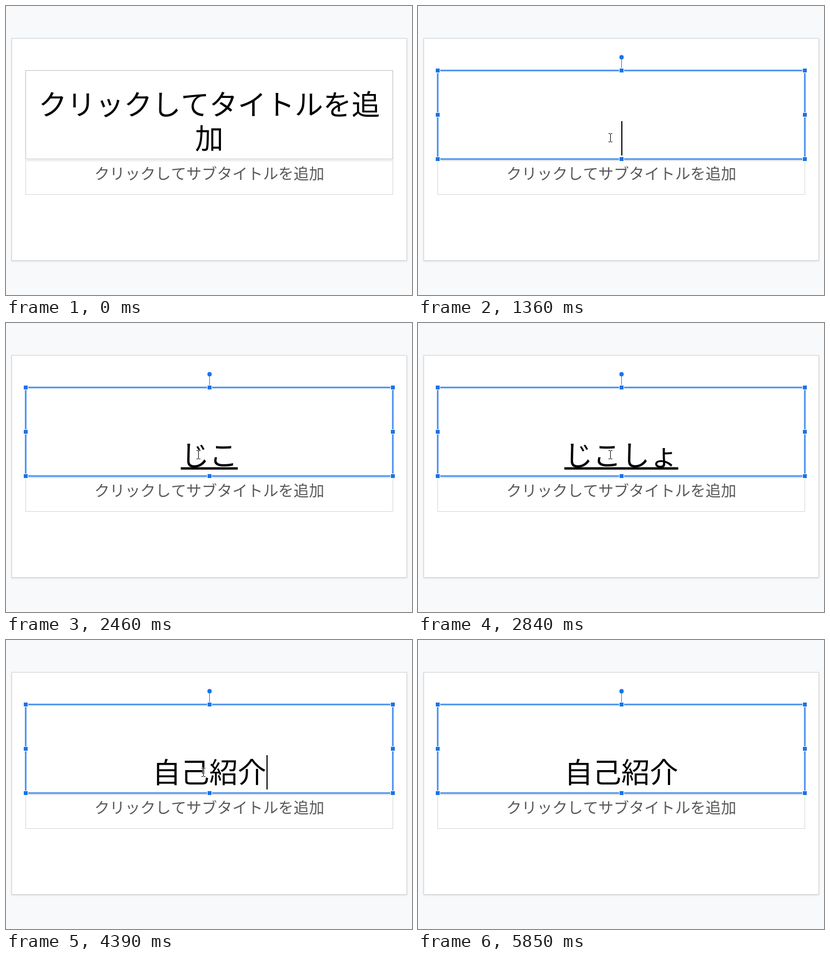
Write an HTML page with a canvas that moves like this. It is 731 px wide and 522 px high and loops after 5.93 s.

```html
<!DOCTYPE html>
<html lang="ja">
<head>
<meta charset="utf-8">
<title>スライドのタイトル入力</title>
<style>
  html, body { margin: 0; width: 100%; height: 100%; overflow: hidden; background: #f8f9fb; }
  canvas { display: block; }
</style>
</head>
<body>
<canvas id="stage" width="731" height="522"></canvas>
<script>
const ctx = document.getElementById('stage').getContext('2d');
const LOOP = 5930;
const MID = 366;
const EM = 51.28;
const BASE = 258;
const BLUE = '#1a73e8';
const FONT = '"Noto Sans CJK JP", "Noto Sans CJK", sans-serif';

// Title input: [start, text, underlined]
const TYPING = [
  [1360, '', false],
  [2080, 'ｊ', true],
  [2230, 'じ', true],
  [2310, 'じｋ', true],
  [2460, 'じこ', true],
  [2540, 'じこｓ', true],
  [2610, 'じこｓｈ', true],
  [2840, 'じこしょ', true],
  [2920, 'じこしょう', true],
  [3070, 'じこしょうｋ', true],
  [3160, 'じこしょうか', true],
  [3230, 'じこしょうかい', true],
  [3310, '自己紹介', true],
  [3690, '自己紹介', false]
];

// Caret opacity: [start, alpha]
const CARET = [
  [1360, 1], [1840, .5], [1910, 0],
  [3690, 1], [4700, .5], [4770, 0],
  [5160, .5], [5240, 1], [5780, .5], [5850, 0]
];

const at = (keys, t) => keys.filter(k => k[0] <= t).pop();
const mix = (a, b, u) => a + (b - a) * u;
const smooth = u => u * u * (3 - 2 * u);

function text(str, y, size, color) {
  ctx.font = `400 ${size}px ${FONT}`;
  ctx.fontKerning = 'none';
  ctx.textAlign = 'center';
  ctx.fillStyle = color;
  ctx.fillText(str, MID, y);
}

function frame(x, y, w, h, color, width = 1) {
  ctx.strokeStyle = color;
  ctx.lineWidth = width;
  ctx.strokeRect(x, y, w, h);
}

function rect(x, y, w, h, color) {
  ctx.fillStyle = color;
  ctx.fillRect(x, y, w, h);
}

function disc(x, y, r, color) {
  ctx.fillStyle = color;
  ctx.beginPath();
  ctx.arc(x, y, r, 0, Math.PI * 2);
  ctx.fill();
}

function drawSlide() {
  rect(0, 0, 731, 522, '#f8f9fb');
  ctx.save();
  ctx.shadowColor = 'rgba(60,64,67,.2)';
  ctx.shadowBlur = 3;
  ctx.shadowOffsetY = 1;
  rect(10, 58, 712, 402, '#d3d5d7');
  ctx.restore();
  rect(11, 59, 710, 400, '#fff');
  frame(35.5, 279.5, 661, 61, '#d6d6d6');
  text('クリックしてサブタイトルを追加', 313.2, 27.61, '#595959');
}

function drawPrompt() {
  frame(35.5, 116.5, 661, 160, '#bdbdbd');
  text('クリックしてタイトルを追', BASE - 61.5, EM, '#000');
  text('加', BASE, EM, '#000');
}

function drawSelection() {
  frame(35.5, 116.5, 661, 160, '#b8d4fa', 4);
  frame(35.5, 116.5, 661, 160, BLUE, 1.6);
  rect(366, 95, 1, 18, BLUE);
  for (const x of [35.5, 366.5, 696.5]) {
    for (const y of [116.5, 196.5, 276.5]) {
      if (x === 366.5 && y === 196.5) continue;
      rect(x - 4.5, y - 4.5, 9, 9, '#fff');
      rect(x - 3.5, y - 3.5, 7, 7, BLUE);
    }
  }
  disc(366.5, 92.5, 3.9, BLUE);
}

function drawTitle(t) {
  const [, str, underlined] = at(TYPING, t);
  const width = str.length * EM;
  text(str, BASE, EM, '#000');
  if (underlined) rect(MID - width / 2, 260.5, width, 4.3, '#000');
  const caret = at(CARET, t);
  ctx.globalAlpha = caret[1];
  rect(Math.round(MID + width / 2), 208, 2, 62, '#000');
  ctx.globalAlpha = 1;
}

// Pointer position, or null while it is off stage
function pointer(t) {
  if (t < 130 || t >= 5550) return null;
  if (t < 1000) {
    const i = Math.min(9, Math.floor((t - 130) / 77.6));
    if (i > 7) return [349.5 - 1.5 * (i - 7), 242 - 2 * (i - 7)];
    const u = 1 - (1 - i / 7) ** 2;
    return [mix(652, 349.5, u), mix(504, 242, u)];
  }
  if (t < 4390) return [346.5, 238];
  if (t < 5160) {
    const i = Math.min(6, Math.floor((t - 4390) / 76.6));
    const u = smooth((i + 1) / 7);
    return [mix(346.5, 517, u), mix(238, 370, u ** 1.6)];
  }
  const u = (Math.floor((t - 5160) / 78) + 1) / 5;
  return [mix(517, 684, u * u), mix(370, 512, u * u)];
}

function drawBeam(x, y) {
  ctx.beginPath();
  ctx.moveTo(x - 3.5, y - 7.5);
  ctx.lineTo(x - .5, y - 7.5);
  ctx.moveTo(x + .5, y - 7.5);
  ctx.lineTo(x + 3.5, y - 7.5);
  ctx.moveTo(x, y - 7);
  ctx.lineTo(x, y + 7);
  ctx.moveTo(x - 3.5, y + 7.5);
  ctx.lineTo(x - .5, y + 7.5);
  ctx.moveTo(x + .5, y + 7.5);
  ctx.lineTo(x + 3.5, y + 7.5);
  for (const [color, width] of [['#fff', 2.6], ['#000', 1]]) {
    ctx.strokeStyle = color;
    ctx.lineWidth = width;
    ctx.stroke();
  }
}

function drawArrow(x, y) {
  const outline = [[0, 0], [0, 16], [3.8, 12.6], [6.5, 18.5], [9, 17.4], [6.4, 11.6], [11.5, 11.5]];
  ctx.beginPath();
  for (const [dx, dy] of outline) ctx.lineTo(x + dx, y + dy);
  ctx.closePath();
  ctx.fillStyle = '#fff';
  ctx.fill();
  ctx.strokeStyle = '#000';
  ctx.lineWidth = 1;
  ctx.stroke();
}

function drawPointer(t) {
  const pos = pointer(t);
  if (!pos) return;
  const x = Math.floor(pos[0]) + .5;
  const y = Math.round(pos[1]);
  const overText = y < 341 && y > 116 && x < 697;
  if (t >= 1210 && t < 1360) {
    ctx.globalCompositeOperation = 'multiply';
    disc(344, 237, 12, '#ffff38');
    ctx.globalCompositeOperation = 'source-over';
  }
  if (overText) drawBeam(x, y);
  else drawArrow(x, y + .5);
}

function draw(now) {
  const t = now % LOOP;
  drawSlide();
  if (t < 1360) {
    drawPrompt();
  } else {
    drawTitle(t);
    drawSelection();
  }
  drawPointer(t);
}

let start;
function tick(now) {
  start ??= now;
  draw(now - start);
  requestAnimationFrame(tick);
}
requestAnimationFrame(tick);
</script>
</body>
</html>
```
